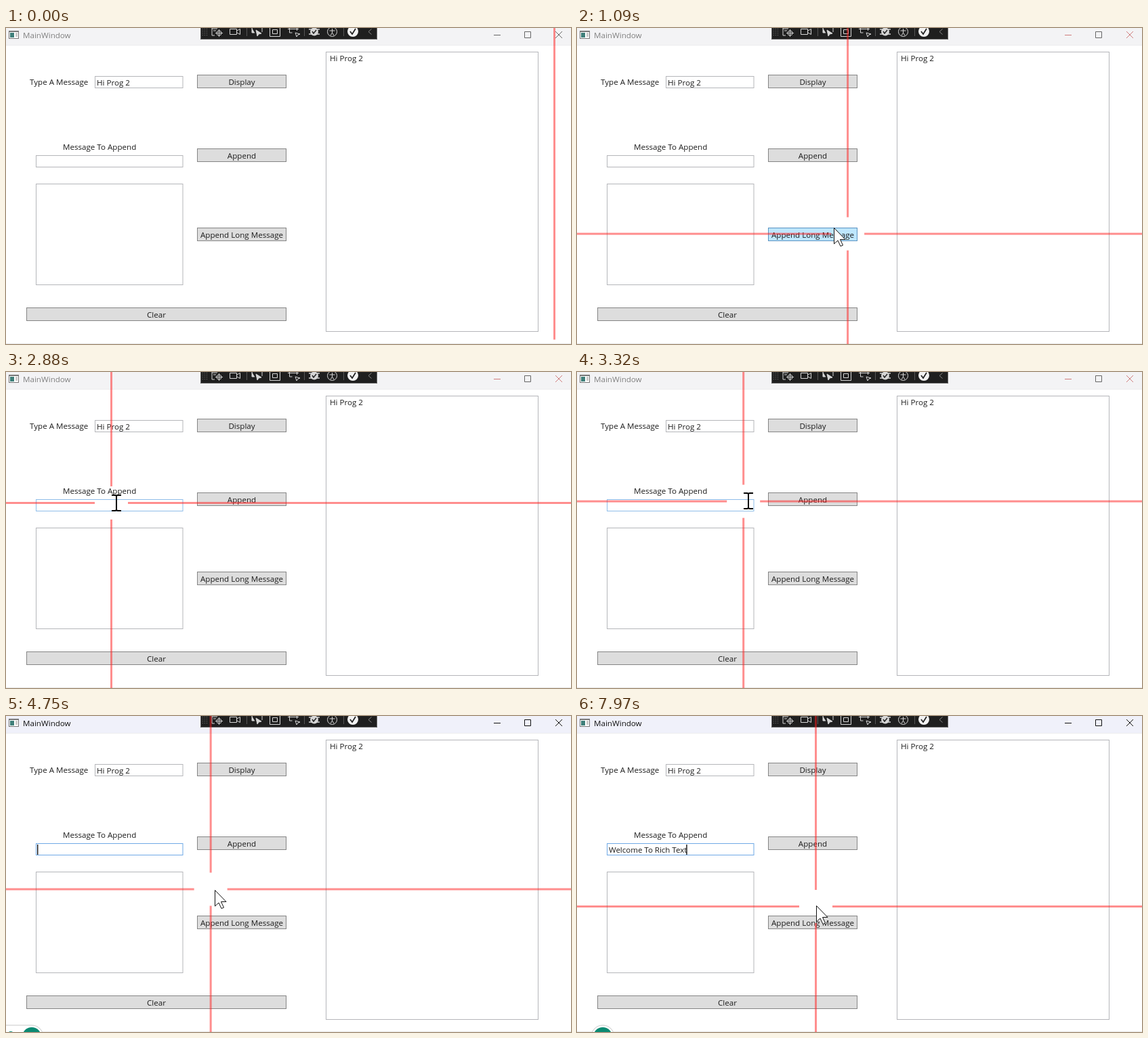
Recreate the animation shown at these times as an HTML page with a canvas. Size 834 px wide and 467 px high, loop 8 s.

```html
<!DOCTYPE html>
<html lang="en">
<head>
<meta charset="utf-8">
<title>Message form</title>
<style>
  html, body { margin: 0; width: 100%; height: 100%; overflow: hidden; background: #fff; }
  canvas { display: block; }
</style>
</head>
<body>
<canvas id="stage" width="834" height="467"></canvas>
<script>
const g = document.getElementById('stage').getContext('2d');
const LOOP = 8000, FOCUS_AT = 4280;
const STEP = 75;  // ms between screen updates
const LAG = 30;   // ms the crosshair trails the cursor

// Pointer moves: start, end, then where it comes to rest
const moves = [
  [0, 1, 809.5, 485], [425, 800, 553.5, 359.5], [800, 1300, 211.5, 236.5],
  [1575, 1650, 213.5, 234.5], [1650, 1720, 219.5, 233.5], [1720, 1870, 158.5, 196.5],
  [2015, 2090, 150.5, 193.5], [2879, 2880, 155.5, 193.5], [2880, 3670, 345.5, 188.5],
  [3685, 3890, 291.5, 188.5], [3890, 4050, 200.5, 204.5], [4205, 4990, 352.5, 281.5]
];

// Typing pace: time, letters typed by then
const typed = 'Welcome To Rich Text';
const pace = [[5140, 1], [5510, 2], [6130, 8], [6790, 12], [7430, 17], [7900, 20]];

// x, y, width, height
const rich = [472, 35, 313, 413], nameBox = [131, 71, 129.5, 17],
      input = [44, 188, 216.5, 17], longBox = [44, 230, 216.5, 149];
const fields = [rich, nameBox, input, longBox];
const button = (label, y, x = 282, w = 131) => ({ label, area: [x, y, w, 19] });
const buttons = [
  button('Display', 69), button('Append', 178),
  button('Append Long Message', 295), button('Clear', 413, 30, 383)
];

const clamp = u => Math.min(1, Math.max(0, u));
const inside = ([x, y, w, h], px, py) => px >= x && px <= x + w && py >= y && py <= y + h;

function pointerAt(t) {
  let [, , x, y] = moves[0];
  for (const [start, end, toX, toY] of moves) {
    const u = clamp((t - start) / (end - start));
    x += (toX - x) * u;
    y += (toY - y) * u;
  }
  return [x, y];
}

// Holds the time still between two screen updates
function held(t) {
  const start = moves.filter(m => m[0] <= t).pop()[0];
  return t - (t - start) % STEP;
}

function lettersAt(t) {
  if (t < pace[0][0]) return 0;
  const i = pace.findIndex(p => p[0] > t);
  if (i < 0) return typed.length;
  const [t0, n0] = pace[i - 1], [t1, n1] = pace[i];
  return Math.floor(n0 + (n1 - n0) * (t - t0) / (t1 - t0));
}

function rect(x, y, w, h, fill) {
  g.fillStyle = fill;
  g.fillRect(x, y, w, h);
}

function box([x, y, w, h], fill, edge) {
  rect(x, y, w, h, fill);
  g.strokeStyle = edge;
  g.lineWidth = 1;
  g.strokeRect(x + .5, y + .5, w, h);
}

function text(s, x, y, color = '#1c1c1c', size = 11.6, align = 'left') {
  g.font = size + 'px "Open Sans", "Noto Sans", sans-serif';
  g.textAlign = align;
  g.fillStyle = color;
  g.fillText(s, x, y);
}

function path(d, color, width = 1, fill) {
  const p = new Path2D(d);
  if (fill) { g.fillStyle = fill; g.fill(p); }
  g.strokeStyle = color;
  g.lineWidth = width;
  g.stroke(p);
}

function disc(x, y, r, fill, edge) {
  g.beginPath();
  g.arc(x, y, r, 0, 7);
  if (fill) { g.fillStyle = fill; g.fill(); }
  if (edge) { g.strokeStyle = edge; g.lineWidth = 1; g.stroke(); }
}

function titleBar(t) {
  const active = t >= FOCUS_AT;
  const ink = active ? '#111' : '#666';
  const tint = !active && t >= 70 ? '#cf7c7c' : ink;
  rect(0, 0, 834, 25, active ? '#f0f1fa' : '#f3f3f5');
  rect(0, 25, 834, 1, '#ececef');
  rect(4, 4, 15, 12, '#777');
  rect(5, 6, 13, 9, '#fff');
  rect(6, 7, 6, 7, '#3f7f7a');
  rect(14, 7, 3, 6, '#ccc');
  text('MainWindow', 25, 15, active ? '#111' : '#808080');
  path('M720 10.5h10', tint);
  path('M765.5 5.5h9v9h-9z', ink);
  path('M811 5l10 10m0-10l-10 10', tint);
}

function toolbar() {
  const light = '#d6d6d6', dark = '#1f1f1f';
  rect(287, 0, 261, 17, dark);
  path('M287.5 0v16.5h260V0', '#666');
  for (let i = 0; i < 12; i++) rect(290 + i % 3 * 3, 1 + (i / 3 | 0) * 3, 1, 1, '#777');
  path('M304 0v11h4M304 1h8M306 4h4M314.5 2v11M309 7.5h11', light);
  disc(314.5, 7.5, 3.5, null, light);
  path('M330.5 1.5h10v8h-10zM341 4l4.5-2.5v8L341 7', light);
  path('M355.5 0v12M440.5 0v12M498.5 0v12', '#555');
  path('M363 0v7h4M378 0v6M369 3l2 9 2-3 4-1z', light, 1, light);
  path('M389.5 0v12.5h15V0M393.5 2.5h7v6h-7z', light);
  path('M416 1.5h16M418.5 0v7h4M429.5 0v4M427 7l2 6 2-3 3-1z', light);
  disc(455, 5.5, 6, light);
  path('M447 2h4M459 2h4M447 9h4M459 9h4', light, 1.5);
  path('M452 5l2 3 4-5', dark, 1.5);
  disc(481.5, 5.5, 7, null, light);
  path('M477.5 4h8M481.5 1v6l-2.5 4M481.5 7l2.5 4', light);
  disc(512, 5, 8, '#f2f2f2');
  path('M508 5l3 4 5-8', dark, 1.7);
  path('M539.5 1.5l-4.5 4 4.5 4', '#888');
}

function form(t, x, y) {
  for (const f of fields) {
    const focused = f === input && t >= FOCUS_AT;
    box(f, '#fff', focused ? '#6fa9e6' : inside(f, x, y) ? '#8fbdea' : '#b5b6ba');
  }
  for (const { label, area } of buttons) {
    const hot = inside(area, x, y);
    box(area, hot ? '#bee6fd' : '#ddd', hot ? '#5a93c2' : '#858585');
    text(label, area[0] + area[2] / 2 + .5, area[1] + 15, undefined, undefined, 'center');
  }
  text('Type A Message', 35, 84);
  text('Message To Append', 84, 179.5);
  text('Hi Prog 2', 134, 85);
  text('Hi Prog 2', 478, 49);

  const shown = typed.slice(0, lettersAt(t));
  text(shown, 47, 202, undefined, 11.5);
  if (t >= FOCUS_AT) rect(46 + g.measureText(shown).width, 190, 1.4, 15, '#111');
}

function badge(t) {
  if (t < 4500) return;
  const open = t < 7000, left = open ? -20 : 21;
  g.beginPath();
  g.roundRect(left, 457, 55 - left, 34, 17);
  g.fillStyle = '#fff';
  g.fill();
  g.strokeStyle = '#c8c8c8';
  g.lineWidth = 1;
  g.stroke();
  if (open) disc(7, 470, 4, '#0b8a72');
  disc(38, 474, 14, '#0b8a72');
}

function crosshair(x, y) {
  const gap = 24.5, red = 'rgba(255,30,30,.5)';
  rect(x - 1.5, 0, 3, y - gap, red);
  rect(x - 1.5, y + gap, 3, 467, red);
  rect(0, y - 1.5, x - gap, 3, red);
  rect(x + gap, y - 1.5, 834, 3, red);
}

function cursor(x, y) {
  g.save();
  g.translate(Math.round(x), Math.floor(y - 1));
  if (fields.some(f => inside(f, x, y))) {
    path('M-7-10h5q2 0 2 2 0-2 2-2h5M0-9v20M-7 13h5q2 0 2-2 0 2 2 2h5', '#000', 2);
  } else {
    path('M.5.5v23.500l5.500-5 4 8.500 3.500-1.500-4-8.500h7.500z', '#111', 1, '#fff');
  }
  g.restore();
}

function draw(now) {
  const t = now % LOOP, s = held(t);
  const [x, y] = pointerAt(s);
  rect(0, 0, 834, 467, '#fff');
  rect(0, 466, 834, 1, '#e8e8e8');
  titleBar(t);
  toolbar();
  form(t, x, y);
  badge(t);
  crosshair(x, y);
  cursor(...pointerAt(s + LAG));
}

const start = performance.now();
(function tick() {
  draw(performance.now() - start);
  requestAnimationFrame(tick);
})();
</script>
</body>
</html>
```
